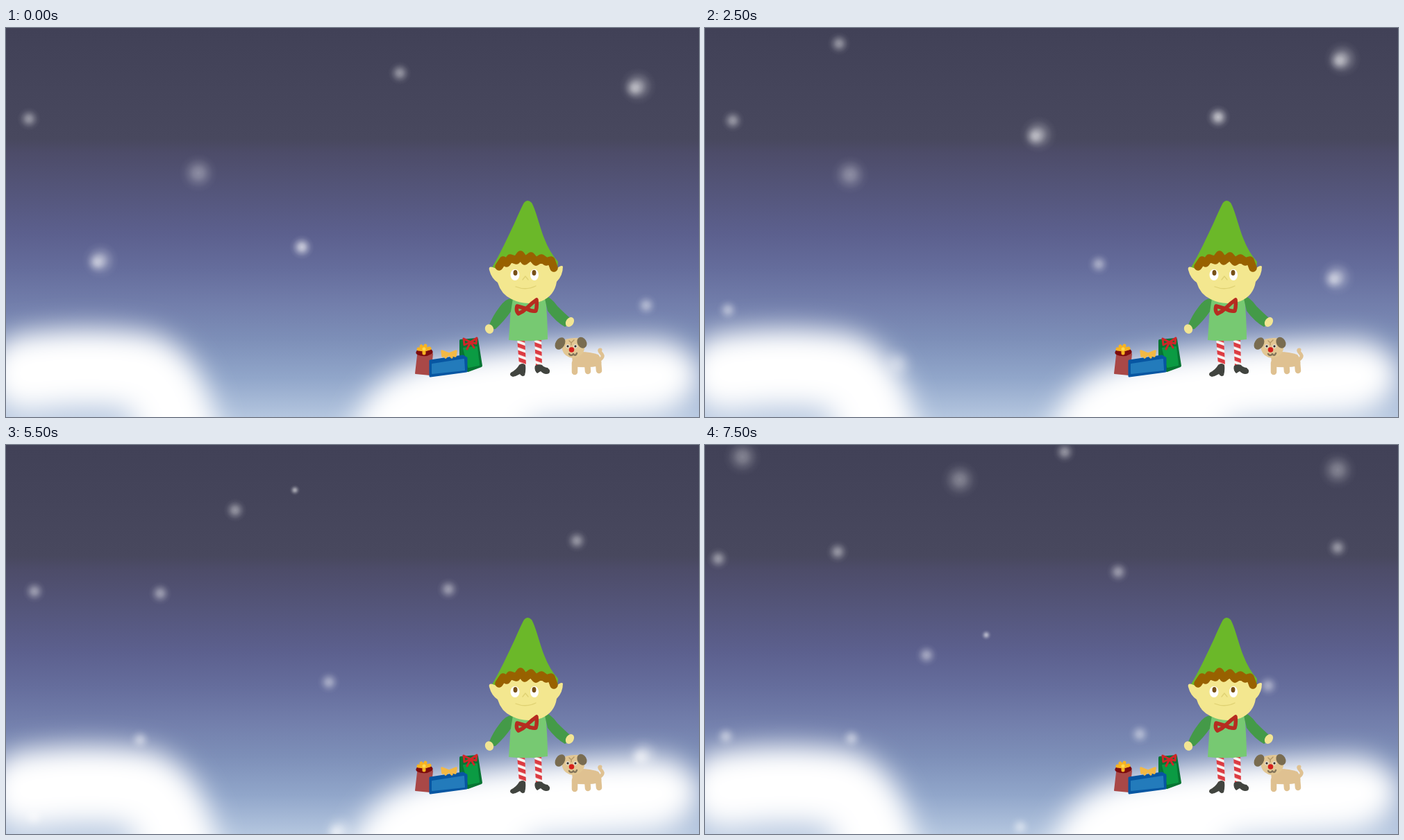
Write an HTML page that moves like this. It is 998 px wide and 561 px high and loops after 8000 ms.

```html
<!DOCTYPE html>
<html lang="en">
<head>
<meta charset="utf-8">
<title>Elf in the snow</title>
<style>
html, body { margin: 0; width: 100%; height: 100%; overflow: hidden; background: #414157; }
svg { display: block; width: 100vw; height: 100vh; }
.line { fill: none; stroke-linecap: round; stroke-linejoin: round; }
</style>
</head>
<body>
<svg viewBox="0 0 998 561" preserveAspectRatio="none">
  <defs>
    <linearGradient id="sky" x1="0" y1="0" x2="0" y2="1">
      <stop offset="0" stop-color="#414157"/>
      <stop offset=".285" stop-color="#48485e"/>
      <stop offset=".32" stop-color="#4d4c69"/>
      <stop offset=".53" stop-color="#5c608e"/>
      <stop offset=".62" stop-color="#656d9c"/>
      <stop offset=".71" stop-color="#727eab"/>
      <stop offset=".8" stop-color="#7d8fb8"/>
      <stop offset=".9" stop-color="#91a6ca"/>
      <stop offset="1" stop-color="#b4c6df"/>
    </linearGradient>
    <radialGradient id="glow">
      <stop offset="0" stop-color="#fff"/>
      <stop offset=".25" stop-color="#fff" stop-opacity=".8"/>
      <stop offset=".5" stop-color="#fff" stop-opacity=".4"/>
      <stop offset=".75" stop-color="#fff" stop-opacity=".11"/>
      <stop offset="1" stop-color="#fff" stop-opacity="0"/>
    </radialGradient>
    <filter id="soft" filterUnits="userSpaceOnUse" x="-120" y="340" width="1240" height="400">
      <feGaussianBlur stdDeviation="19"/>
    </filter>
    <pattern id="stripes" width="30" height="9.5" patternUnits="userSpaceOnUse" patternTransform="translate(0 449) rotate(20)">
      <rect width="30" height="9.5" fill="#fbf3f0"/>
      <rect width="30" height="5.5" fill="#dc3b42"/>
    </pattern>
  </defs>

  <rect width="998" height="561" fill="url(#sky)"/>

  <g filter="url(#soft)">
    <path d="M30 498Q110 486 190 496Q250 508 255 660" class="line" stroke="#fff" stroke-width="114"/>
    <path d="M488 660C490 530 545 490 640 476C740 459 850 451 940 450Q990 458 1000 500Q990 548 930 558L760 568L700 660Z" fill="#fff"/>
  </g>

  <g id="presents">
    <path d="M593 472L614 470L611 500L590 498Z" fill="#a94847" stroke="#a94847" stroke-width="2" stroke-linejoin="round"/>
    <path d="M594 468Q603 472 611 467" class="line" stroke="#7d0c0e" stroke-width="7"/>
    <path d="M602 464L594 463M602 464L598 459M602 464L604 458M602 464L610 462M602 464V469" class="line" stroke="#f7b321" stroke-width="5"/>
    <circle cx="602" cy="463" r="2.5" fill="#ffd84d"/>

    <path d="M655 451L678 449L684 487L665 494L655 481Z" fill="#077533" stroke="#077533" stroke-width="4" stroke-linejoin="round"/>
    <path d="M659 462L678 460L681 486L666 489Z" fill="#0b9b43" stroke="#0b9b43" stroke-width="2" stroke-linejoin="round"/>
    <path d="M669 453L659 448L660 457ZL678 447L677 455ZL664 463M669 453L674 461" class="line" stroke="#cf2528" stroke-width="3"/>

    <path d="M611 480L658 473L663 476V495L611 502Z" fill="#0756a2" stroke="#0756a2" stroke-width="3" stroke-linejoin="round"/>
    <path d="M614 485L659 478L660 493L614 498Z" fill="#237bbb" stroke="#237bbb" stroke-width="2" stroke-linejoin="round"/>
    <path d="M638 470L628 466L629 473ZL648 466L647 473ZL633 475M638 470L642 475" class="line" stroke="#f3b945" stroke-width="3.5" style="fill:#f3b945"/>
  </g>

  <g id="elf">
    <path d="M736 447H747L749 486H739ZM761 447H771L772 487H763Z" fill="url(#stripes)"/>
    <path d="M739 486Q744 482 748 486Q749 494 747 501Q743 504 740 499Q735 502 730 503Q724 501 727 497Q735 493 739 486ZM762 487Q767 484 772 486Q774 489 780 490Q785 494 782 498Q776 501 770 495L765 498Q760 494 762 487Z" fill="#41443f"/>
    <path d="M728 388H777Q780 420 780 449Q752 453 724 450Q726 418 728 388Z" fill="#77c972"/>
    <path d="M730 390Q720 389 711 402Q701 415 696 428Q700 435 705 434Q718 422 727 409ZM775 386Q784 387 794 401Q804 411 812 418Q812 428 805 431Q792 424 780 408Z" fill="#449a48"/>
    <g fill="#f2e593">
      <ellipse cx="696" cy="434" rx="6" ry="7" transform="rotate(-25 696 434)"/>
      <ellipse cx="812" cy="424" rx="5.500" ry="7.500" transform="rotate(32 812 424)"/>
    </g>

    <path d="M699 347C712 325 723 301 732 282Q742 259 746 252Q751 246 757 252C763 262 768 285 775 303Q783 324 795 337L794 347Z" fill="#6bb829"/>
    <path d="M711 337H787L793 347Q800 341 802 344Q802 357 793 366Q790 386 771 394Q748 401 728 391Q713 384 708 367Q699 361 696 349Q694 341 706 347Z" fill="#f3e78f"/>
    <path d="M710 344L716 335L721 339L726 332L735 335L741 327L747 336L756 329L763 337L771 332L778 337L785 335L789 346" class="line" stroke="#986100" stroke-width="11.500"/>
    <g fill="#fff">
      <ellipse cx="733" cy="356" rx="6.500" ry="8"/>
      <ellipse cx="761" cy="356" rx="6" ry="8"/>
    </g>
    <g fill="#775016">
      <ellipse cx="733.500" cy="353" rx="3" ry="4"/>
      <ellipse cx="760.500" cy="353" rx="3" ry="4"/>
    </g>
    <path d="M744 363L748 358L752 363M734 373Q749 379 763 372" class="line" stroke="#dfd173" stroke-width="1.300"/>
    <path d="M750 405L736 401Q734 408 738 412Q745 409 751 403Q758 396 764 392Q765 402 763 408Q757 409 750 405" class="line" stroke="#b62c20" stroke-width="5.500"/>
  </g>

  <g id="dog">
    <path d="M852 480Q863 475 857 469Q853 464 856 464" class="line" stroke="#dfc191" stroke-width="5"/>
    <path d="M819 483V496M837 482L838 495M853 482L854 494" class="line" stroke="#dfc191" stroke-width="8.500"/>
    <path d="M815 468Q835 465 853 471Q860 479 856 487Q837 491 816 488Z" fill="#dfc191"/>
    <path d="M800 453Q807 446 823 447Q834 452 833 463Q830 475 816 476Q804 474 801 464Z" fill="#e2c794"/>
    <g fill="#796c50">
      <ellipse cx="798" cy="455" rx="6.500" ry="9.500" transform="rotate(32 798 455)"/>
      <ellipse cx="829.500" cy="454" rx="6.500" ry="8.500" transform="rotate(-30 829 454)"/>
    </g>
    <path d="M811 451L814 454L818 450M814 454V457" class="line" stroke="#b69a69" stroke-width="1.500"/>
    <path d="M811 470Q814 474 817 470Q820 474 822 469" class="line" stroke="#85765a" stroke-width="2.500"/>
    <g fill="#3c3428" stroke="#fff"><circle cx="809" cy="459" r="2.200"/><circle cx="820" cy="459" r="2.200"/></g>
    <circle cx="814.500" cy="464" r="3.800" fill="#d6201c"/>
  </g>

  <g id="snow"></g>
</svg>
<script>
const STEP = 500, LOOP = 8000;
const snow = document.getElementById('snow');

function addGlow(x, y, r, opacity) {
  const dot = document.createElementNS('http://www.w3.org/2000/svg', 'circle');
  const attrs = { cx: x, cy: y, r, opacity, fill: 'url(#glow)' };
  for (const key in attrs) dot.setAttribute(key, attrs[key]);
  snow.append(dot);
}

// Each kind of flake has one look; a spot is its place before the field drifts
const kinds = {
  small: (x, y) => addGlow(x, y, 17, .42),
  clear: (x, y) => addGlow(x, y, 18, .64),
  wide: (x, y) => addGlow(x, y, 28, .34),
  bright(x, y) {
    addGlow(x, y, 27, .42);
    addGlow(x - 5, y + 3, 17, .4);
  }
};
const spots = {
  small: [[33, 131], [567, 65], [922, 400], [40, -142], [193, -253], [465, -336], [41, -467],
    [222, -464], [637, -470], [330, -584], [822, -540], [30, -723], [202, -733], [606, -704],
    [922, -739], [529, -877]],
  clear: [[426, 316], [739, -147]],
  wide: [[277, 209], [209, -64], [65, -870], [378, -837], [922, -851]],
  bright: [[136, 335], [910, 84], [480, -122], [918, -231]]
};
for (const kind in spots) spots[kind].forEach(spot => kinds[kind](...spot));
addGlow(416, -613, 8, .55);

// Key points of the drift: seconds, x, y
const drift = [
  [0, 0, 0], [1, -5, 130.5], [2, -2, 207], [2.5, 0, 275.5], [3.5, 0, 382],
  [4.5, 0, 508], [5.5, 0, 678], [6.5, 0, 777], [7.5, -11, 887]
];

function driftAt(time) {
  const i = Math.max(1, drift.findIndex(key => key[0] >= time));
  const [from, to] = [drift[i - 1], drift[i]];
  const part = (time - from[0]) / (to[0] - from[0]);
  return [1, 2].map(axis => from[axis] + (to[axis] - from[axis]) * part);
}

const start = performance.now();
function draw(now) {
  const time = Math.max(0, now - start) % LOOP;
  const held = Math.floor(time / STEP) * STEP / 1000;
  snow.setAttribute('transform', `translate(${driftAt(held)})`);
  requestAnimationFrame(draw);
}
draw(start);
</script>
</body>
</html>
```
